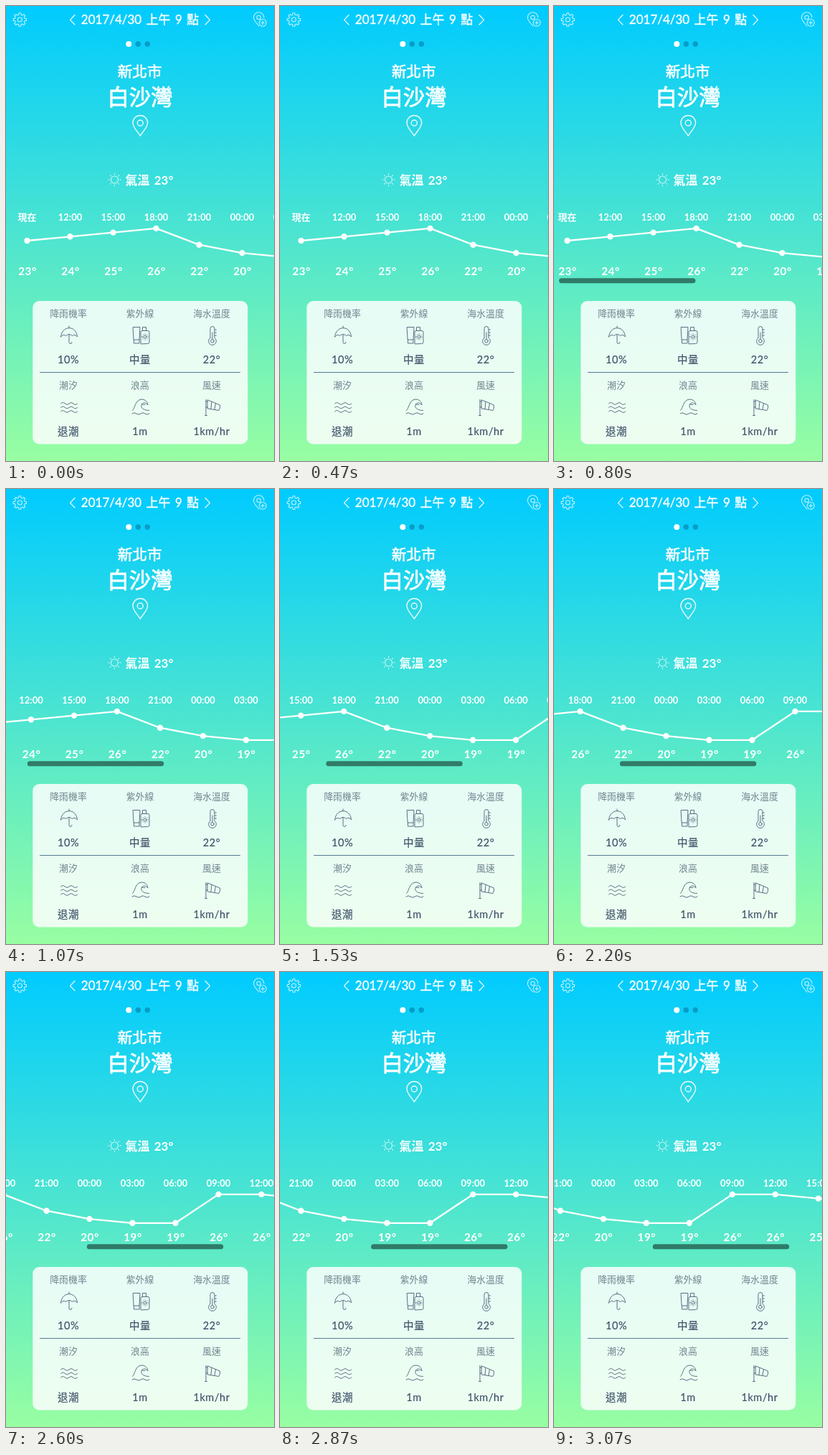
An HTML page that plays this animation: 374x634 px, repeating every 3140 ms.

```html
<!DOCTYPE html>
<html lang="zh-Hant">
<head>
<meta charset="utf-8">
<title>Beach weather</title>
<style>
html, body { margin: 0; width: 100%; height: 100%; overflow: hidden; }
svg { display: block; width: 374px; height: 634px; }
text {
  font-family: Lato, "Noto Sans CJK TC", "Noto Sans CJK JP", "Noto Sans CJK", sans-serif;
  text-anchor: middle;
}
.line { fill: none; stroke-linecap: round; stroke-linejoin: round; }
</style>
</head>
<body>
<svg id="stage" viewBox="0 0 374 634">
  <defs>
    <linearGradient id="sky" x2="0" y2="1">
      <stop stop-color="#00cbff"/>
      <stop offset="1" stop-color="#98fea2"/>
    </linearGradient>
  </defs>
  <rect width="374" height="634" fill="url(#sky)"/>

  <!-- header -->
  <g class="line" stroke="#fff" stroke-width="1.1">
    <path d="M96 12.500L89.500 19.300L96 26M278 12.500L284.500 19.300L278 26"/>
    <g stroke-opacity=".75">
      <path id="gear"/>
      <circle cx="19.300" cy="19" r="3"/>
      <path d="M353 28C349 23 345.500 20 345.500 16A7.200 7.200 0 0 1 360 16"/>
      <circle cx="352.700" cy="16" r="2.700"/>
      <circle cx="358.300" cy="23.300" r="5"/>
      <path d="M355.800 23.300h5M358.300 20.800v5"/>
      <circle cx="151.500" cy="242" r="5"/>
      <path id="rays"/>
    </g>
    <g stroke-width="1.400" stroke-opacity=".9">
      <path d="M187.300 181C183.500 174.500 177 169.500 177 162.800A10.300 10.300 0 0 1 197.600 162.800C197.600 169.500 191 174.500 187.300 181Z"/>
      <circle cx="187.300" cy="163" r="4"/>
    </g>
  </g>
  <circle cx="171.300" cy="53" r="4" fill="#fff"/>
  <g fill="#069dc8"><circle cx="184.300" cy="53" r="3.700"/><circle cx="197.300" cy="53" r="3.700"/></g>

  <g id="chart"></g>
  <rect id="bar" y="379.300" width="190.500" height="7" rx="3.500" fill="#000" opacity="0"/>

  <!-- details card -->
  <rect x="37.300" y="411" width="300" height="199.500" rx="9" fill="#fff" opacity=".84"/>
  <path d="M47 510.500H327" stroke="#557a92"/>
  <g class="line" stroke="#5b7083" stroke-width="1">
    <path d="M76.500 461C78 444.500 98 444.500 99.500 461Q96 456.500 92.500 459.500Q88 455.500 83.500 459.500Q80 456.500 76.500 461ZM88 446v2.500M88 458v10.500a2 2 0 0 0 4 0"/>
    <path d="M177.500 447.500h9.500l-1 17.500h-7.500ZM178.500 465v5h7.500v-5M188 470.500v-16q0-2 2-2h8q2 0 2 2v14q0 2-2 2ZM190.500 452v-4.500h5v4.500"/>
    <circle cx="194" cy="461" r="2"/>
    <path stroke-dasharray=".6 2.400" d="M190 461a4 4 0 1 1 8 0a4 4 0 1 1-8 0"/>
    <path d="M285 462.500V449.500a3 3 0 0 1 6 0V462.500a5.400 5.400 0 1 1-6 0M288 455v9.500M291 451h2.500M291 455h2.500M291 459h2.500"/>
    <circle cx="288" cy="466.800" r="2.300"/>
    <path id="tide"/>
    <path d="M176.500 563.500C180 562 179.500 549 189 548C194.500 548 197.500 551.500 198 556C195.500 552.500 191.500 552 189.500 555C187.500 558.500 190 563.500 199.500 563.500M189.500 555L194 555.500M176 568q3-2.500 6 0t6 0t6 0t6 0"/>
    <path d="M279 548.500V570.500M277.500 570.500h3M279 551h2.500M279 559h2.500M281.500 549L298.500 556Q299.500 560 297 563.500L281.500 561ZM287 551.300L286 561.700M292.500 553.500L291 562.500"/>
  </g>
</svg>
<script>
const $ = id => document.getElementById(id);
const stage = $("stage"), chart = $("chart"), bar = $("bar");

function add(parent, tag, attrs, content = "") {
  const el = document.createElementNS("http://www.w3.org/2000/svg", tag);
  for (const key in attrs) el.setAttribute(key, attrs[key]);
  el.textContent = content;
  return parent.appendChild(el);
}
function label(parent, text, x, y, size, weight, fill = "#fff", more = {}) {
  add(parent, "text", { x, y, "font-size": size, "font-weight": weight, fill, ...more }, text);
}
// a thin outline gives a weight between regular and bold
const outline = width => ({ stroke: "#fff", "stroke-width": width });
const polar = (x, y, r, a) => `${x + r * Math.cos(a)} ${y + r * Math.sin(a)}`;

// icons built from repeated parts
let gear = "", rays = "", tide = "";
for (let i = 0; i < 8; i++) {
  const a = i * Math.PI / 4;
  [[7, -.23], [9.3, -.16], [9.3, .16], [7, .23]].forEach(([r, d]) =>
    gear += (gear ? "L" : "M") + polar(19.3, 19, r, a + d));
  rays += "M" + polar(151.5, 242, 7.2, a) + "L" + polar(151.5, 242, 8.7, a);
}
for (const y of [554, 559.5, 565]) tide += `M76.500 ${y}q2.900-3 5.800 0t5.800 0t5.800 0t5.800 0`;
$("gear").setAttribute("d", gear + "Z");
$("rays").setAttribute("d", rays);
$("tide").setAttribute("d", tide);

label(stage, "2017/4/30 上午 9 點", 187, 24.5, 17, 400, "#fff", { "word-spacing": 2, ...outline(.4) });
label(stage, "新北市", 186.7, 98.8, 20.7, 400, "#fff", outline(.6));
label(stage, "白沙灣", 187, 138.3, 30.4, 400, "#fff", outline(.8));
label(stage, "氣溫 23°", 200, 248.7, 17, 700, "#fff", { "word-spacing": 2 });

// hourly chart
const temps = [23, 24, 25, 26, 22, 20, 19, 19, 26, 26, 25, 24];
const points = temps.map((t, i) => [29.5 + 60 * i, 327 - (t - 23) * 5.7]);
add(chart, "polyline", { points: points.join(" "), class: "line", stroke: "#fff", "stroke-width": 2.3 });
points.forEach(([x, y], i) => {
  const hour = String((9 + 3 * i) % 24).padStart(2, "0") + ":00";
  add(chart, "circle", { cx: x, cy: y, r: 4.2, fill: "#fff" });
  label(chart, i ? hour : "現在", x, 298.5, 13, 700);
  label(chart, temps[i] + "°", x + .5, 375, 15.3, 700, "#fff", { "letter-spacing": .5 });
});

// card texts
[
  ["降雨機率", "10%"], ["紫外線", "中量"], ["海水溫度", "22°"],
  ["潮汐", "退潮"], ["浪高", "1m"], ["風速", "1km/hr"]
].forEach(([name, value], i) => {
  const x = 87 + 100 * (i % 3), y = i < 3 ? 0 : 100;
  label(stage, name, x, 433.3 + y, 12.9, 400, "#70858f");
  label(stage, value, x, 498 + y, 14.5, 400, "#40546a",
    { "letter-spacing": .6, stroke: "#40546a", "stroke-width": .2 });
});

// scroll offset over time, as a smooth curve through [ms, px]
const keys = [[0, 0], [700, 0], [800, 11], [1070, 55], [1530, 120], [2200, 173], [2600, 213], [3070, 261]];
function slope(i) {
  const a = keys[Math.max(i - 1, 0)], b = keys[Math.min(i + 1, keys.length - 1)];
  return (b[1] - a[1]) / (b[0] - a[0]);
}
function scrollAt(t) {
  let i = 0;
  while (i < keys.length - 2 && t > keys[i + 1][0]) i++;
  const [t0, p0] = keys[i], [t1, p1] = keys[i + 1];
  const d = t1 - t0, u = Math.min((t - t0) / d, 1), v = 1 - u;
  const p = v * v * (1 + 2 * u) * p0 + u * u * (3 - 2 * u) * p1
    + d * u * v * (v * slope(i) - u * slope(i + 1));
  return Math.max(p, 0);
}

const LOOP = 3140, STEP = 200 / 3;
function draw(now) {
  const t = Math.min(Math.floor((now % LOOP + 5) / STEP), 46) * STEP;
  const x = scrollAt(t);
  chart.setAttribute("transform", `translate(${-x})`);
  bar.setAttribute("x", 1.2 + x * .524);
  bar.setAttribute("opacity", t > 690 ? .48 : 0);
  requestAnimationFrame(draw);
}
draw(performance.now());
</script>
</body>
</html>
```
